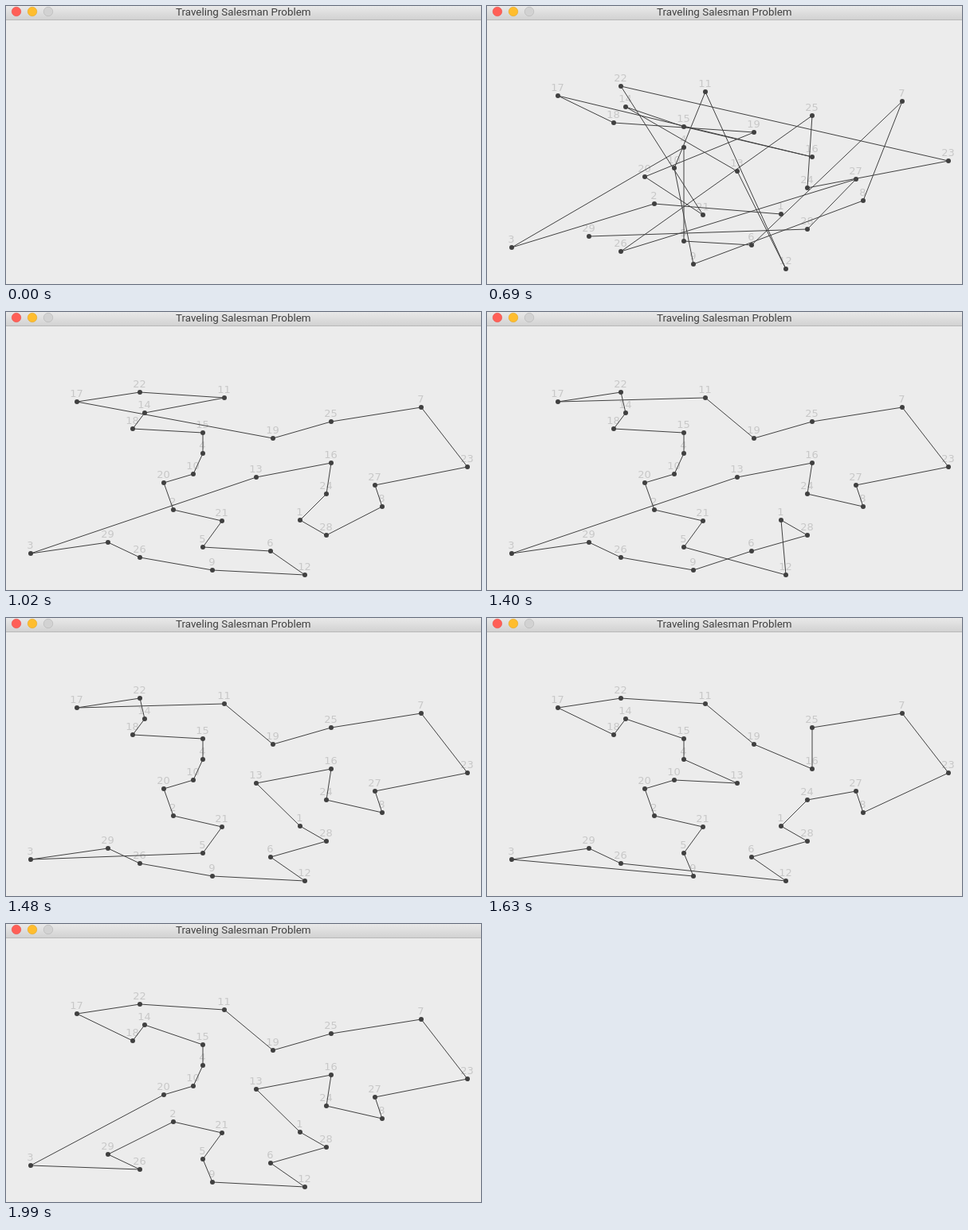
An HTML page that plays this animation: 596 by 350 pixels, repeating every 2.95 s.

```html
<!DOCTYPE html>
<html lang="en">
<head>
<meta charset="utf-8">
<title>Traveling Salesman Problem</title>
<style>
  html, body { margin: 0; width: 100%; height: 100%; overflow: hidden; background: #ececec; }
  svg { display: block; }
  .title { font: 13.4px Roboto, Inter, sans-serif; fill: #404040; }
  .labels { font: 13px "DejaVu Sans", sans-serif; fill: #c8c8c8; text-anchor: middle; }
  .dots { fill: #404040; }
  #route { fill: none; stroke: #404040; stroke-width: 1; stroke-linejoin: round; }
</style>
</head>
<body>
<svg width="596" height="350" viewBox="0 0 596 350">
  <defs>
    <linearGradient id="bar" x2="0" y2="1">
      <stop offset="0" stop-color="#e9e9e9"/>
      <stop offset="1" stop-color="#d2d2d2"/>
    </linearGradient>
  </defs>
  <rect width="596" height="350" fill="#ececec"/>
  <rect width="596" height="17" fill="url(#bar)"/>
  <rect y="17" width="596" height="1" fill="#b8b8b8"/>
  <g id="buttons"></g>
  <text class="title" x="213" y="12">Traveling Salesman Problem</text>
  <g id="map">
    <g class="labels"></g>
    <path id="route"/>
    <g class="dots"></g>
  </g>
</svg>
<script>
const LOOP = 2950;

// City n sits at index n - 1.
const cities = [
  [369, 262], [210, 249], [31, 304], [247, 178], [247, 296], [332, 301],
  [521, 120], [472, 245], [259, 325], [235, 204], [274, 108], [375, 331],
  [314, 208], [174, 127], [247, 152], [408, 190], [89, 113], [159, 147],
  [335, 159], [198, 215], [271, 263], [168, 101], [579, 195], [402, 229],
  [408, 138], [168, 309], [463, 218], [402, 281], [128, 290]
];

const parse = list => list.split(" ").map(Number);
const firstTour = parse("3 29 26 9 12 6 5 21 2 20 10 4 15 18 14 11 22 17 19 25 7 23 27 8 28 1 24 16 13");

// "a>b" moves city a behind city b; "a~b" reverses the stretch from a to b.
function mutate(tour, edits) {
  const next = [...tour];
  for (const edit of edits.split(" ")) {
    const [a, b] = edit.split(/[>~]/).map(Number);
    const from = next.indexOf(a);
    if (edit.includes("~")) {
      const part = next.slice(from, next.indexOf(b) + 1).reverse();
      next.splice(from, part.length, ...part);
    } else {
      next.splice(from, 1);
      next.splice(next.indexOf(b) + 1, 0, a);
    }
  }
  return next;
}

const pathOf = tour => "M" + tour.map(n => cities[n - 1]).join("L");

// An open path in numeric order, then closed tours that improve step by step.
const routes = [
  { at: 690, path: pathOf(cities.map((_, i) => i + 1)) },
  { at: 1020, path: pathOf(firstTour) + "Z" }
];
let tour = firstTour;
for (const [at, edits] of [
  [1400, "11>17 12>6 28>6 1>28"],
  [1460, "12>9"],
  [1480, "5~13"],
  [1630, "9>5 13>4 16>25 8>27 22>11 18>17"],
  [1990, "29>26 2>29 21>2 5>21 9>5 13>1 16>13 27>8"]
]) {
  tour = mutate(tour, edits);
  routes.push({ at, path: pathOf(tour) + "Z" });
}

const map = document.getElementById("map");
const route = document.getElementById("route");

function add(parent, tag, attrs, text = "") {
  const el = document.createElementNS("http://www.w3.org/2000/svg", tag);
  for (const key in attrs) el.setAttribute(key, attrs[key]);
  el.textContent = text;
  parent.append(el);
}

const buttons = document.getElementById("buttons");
[["#ff5f57", "#e8514a"], ["#ffbd2e", "#e3a624"], ["#d2d2d2", "#b4b4b4"]].forEach(([fill, stroke], i) =>
  add(buttons, "circle", { cx: 13 + 20 * i, cy: 7, r: 5.75, fill, stroke, "stroke-width": .6 }));

const labels = map.querySelector(".labels");
const dots = map.querySelector(".dots");
cities.forEach(([x, y], i) => {
  add(labels, "text", { x: x - .5, y: y - 6 }, i + 1);
  add(dots, "circle", { cx: x, cy: y, r: 3 });
});

function render(t) {
  const current = routes.filter(r => r.at <= t).pop();
  map.style.display = current ? "" : "none";
  if (current) route.setAttribute("d", current.path);
}

const start = performance.now();
function tick() {
  render((performance.now() - start) % LOOP);
  requestAnimationFrame(tick);
}
tick();
</script>
</body>
</html>
```
